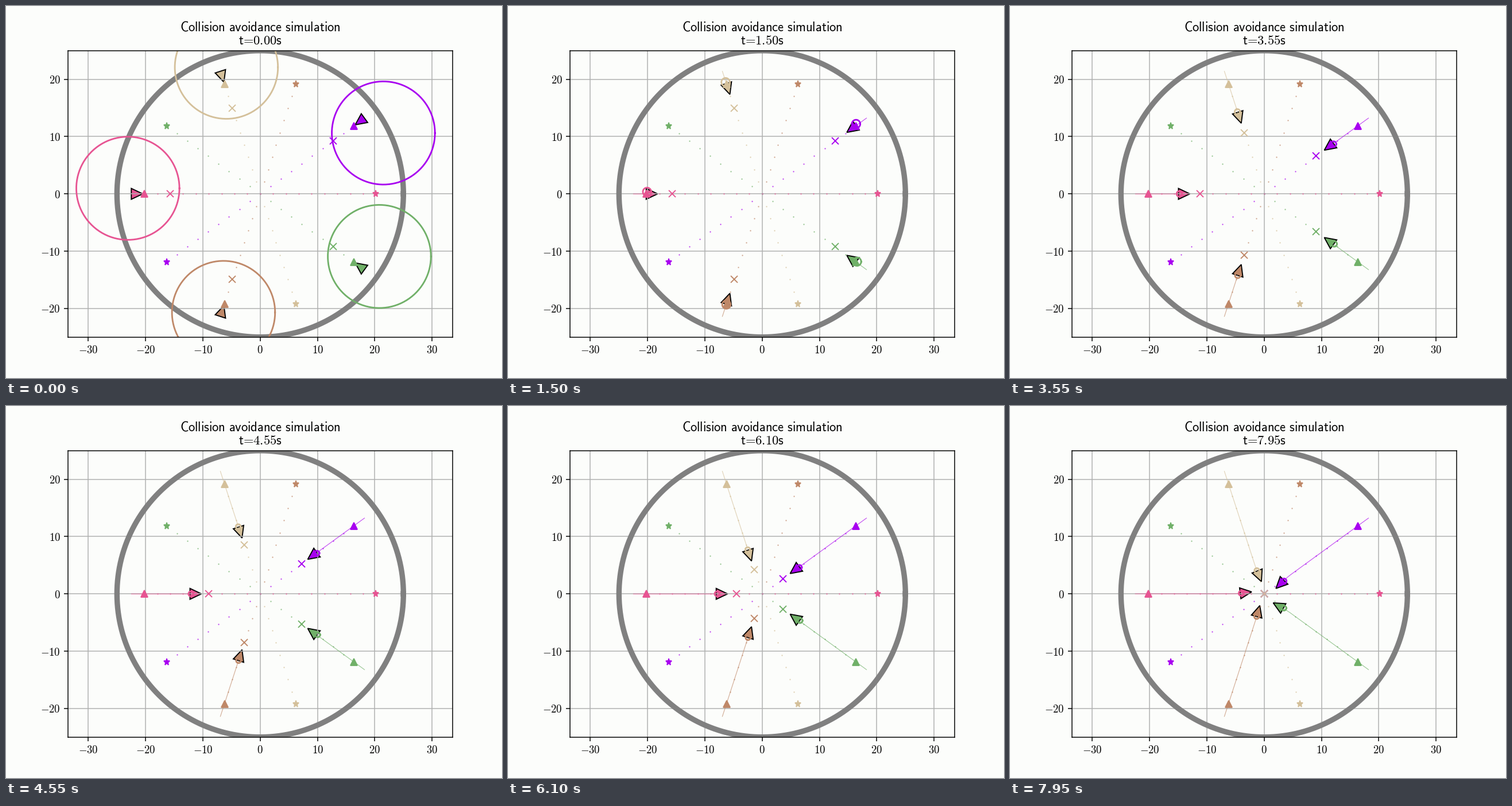
Recreate the animation shown at these times as a matplotlib script. Size 864x648 px, loop 8000 ms.

```python
import numpy as np
import matplotlib.pyplot as plt
from matplotlib.animation import FuncAnimation
from matplotlib.patches import Polygon

plt.rcParams["mathtext.fontset"] = "cm"

W, H, DPI = 864, 648, 135
FRAMES, DT = 160, 0.05
BG = "#fcfdfb"
START, WAY, GAP = 22.5, 20.2, 40.4 / 18   # start radius, first waypoint, spacing
SPEED, LAG = 2.73, 0.8
REACH = 2.1                               # distance at which a waypoint is passed

# colour, polar angle of the start, final left turn in degrees,
# estimate error at four moments (dx, dy)
AGENTS = [
    ("#e75492", 180, 7, [(-.6, .97), (.3, .57), (.1, .27), (.15, 0)]),
    ("#bf8868", 252, 2, [(.55, .7), (-.23, -.2), (.1, 0), (0, 0)]),
    ("#70b068", 324, 7, [(2.6, 2.3), (.4, .07), (.07, .07), (.12, .05)]),
    ("#a800f0", 36, 9, [(3.3, -2.6), (.2, .88), (-.08, .07), (0, -.1)]),
    ("#d4c09a", 108, 4, [(1.05, .7), (-.23, .32), (-.1, .2), (-.05, .08)]),
]

time = np.arange(FRAMES) * DT
ring = np.linspace(0, 2 * np.pi, 1000)
small = np.linspace(0, 2 * np.pi, 100)


def unit(a):
    return np.stack([np.cos(a), np.sin(a)], axis=-1)


def spread(t):
    """Uncertainty radius, shrinking with every measurement."""
    n = np.asarray(t) / DT
    return np.maximum(0.42, 1 / np.sqrt(1 / 81 + n / 16))


def travelled(t):
    brake = 0.44 * np.maximum(t - 6.3, 0) ** 2
    return SPEED * (t - LAG * (1 - np.exp(-t / LAG))) - brake


class Agent:
    def __init__(self, ax, color, angle, turn, errors):
        out = unit(np.radians(angle))
        ease = np.clip((time - 6.7) / 1.25, 0, 1) ** 1.5
        self.heading = np.radians(angle + 180 + turn * ease)
        steps = np.diff(travelled(time), prepend=0)[:, None] * unit(self.heading)
        self.pos = START * out + np.cumsum(steps, axis=0)

        key = -spread([0, 0.65, 2.35, 3.55])
        errors = np.array(errors)
        error = [np.interp(-spread(time), key, errors[:, i]) for i in (0, 1)]
        self.guess = self.pos + np.stack(error, axis=-1)

        left = np.hypot(*self.pos.T)
        k = np.floor((WAY - left + REACH) / GAP).astype(int) + 1
        k = np.maximum.accumulate(np.clip(k, 2, 18))
        self.target = (WAY - k * GAP)[:, None] * out

        dots = (WAY - GAP * np.arange(19))[:, None] * out
        ax.plot(*dots.T, "o", ms=1.2, mew=0, color=color, alpha=0.75)
        ax.plot(*dots[0], "^", ms=6, color=color)
        ax.plot(*dots[-1], "*", ms=6, color=color)
        self.cross, = ax.plot([], [], "x", ms=6, color=color)
        self.trace, = ax.plot([], [], lw=0.6, color=color, alpha=0.7)
        self.circle, = ax.plot([], [], lw=1.5, color=color)
        self.body = Polygon(np.zeros((3, 2)), fc=color, ec="black", lw=1)
        ax.add_patch(self.body)

    def update(self, i):
        p = self.pos[i]
        fwd = unit(self.heading[i])
        side = np.array([-fwd[1], fwd[0]])
        self.body.set_xy([p + 0.95 * side, p - 0.95 * side, p + 2 * fwd])
        self.trace.set_data(*self.pos[:i + 1].T)
        self.cross.set_data(*self.target[i][:, None])
        self.circle.set_data(*(self.guess[i] + spread(time[i]) * unit(small)).T)
        return [self.body, self.trace, self.cross, self.circle]


fig = plt.figure(figsize=(W / DPI, H / DPI), dpi=DPI, facecolor=BG)
ax = fig.add_axes([0.125, 0.11, 0.775, 0.77], facecolor=BG)
half = 25 * (0.775 * W) / (0.77 * H)
ax.set_xlim(-half, half)
ax.set_ylim(-25, 25)
xs, ys = range(-30, 31, 10), range(-20, 21, 10)
ax.set_xticks(xs, [f"${v}$" for v in xs], fontsize=10)
ax.set_yticks(ys, [f"${v}$" for v in ys], fontsize=10)
ax.grid(True)
ax.plot(*(25 * unit(ring)).T, color="#808080", lw=5)


def caption(y, text):
    return fig.text(0.5125, 1 - y / H, text, fontsize=12, ha="center", va="baseline")


caption(43, r"$\mathsf{Collision\ avoidance\ simulation}$")
clock = caption(66.8, "")
agents = [Agent(ax, *spec) for spec in AGENTS]


def draw(i):
    clock.set_text(r"$\mathsf{t\hspace{-0.2}=\hspace{-0.2}%.2fs}$" % time[i])
    return [clock] + [part for a in agents for part in a.update(i)]


anim = FuncAnimation(fig, draw, frames=FRAMES, interval=DT * 1000,
                     init_func=lambda: draw(0), repeat=True, repeat_delay=0)
plt.show()
```
